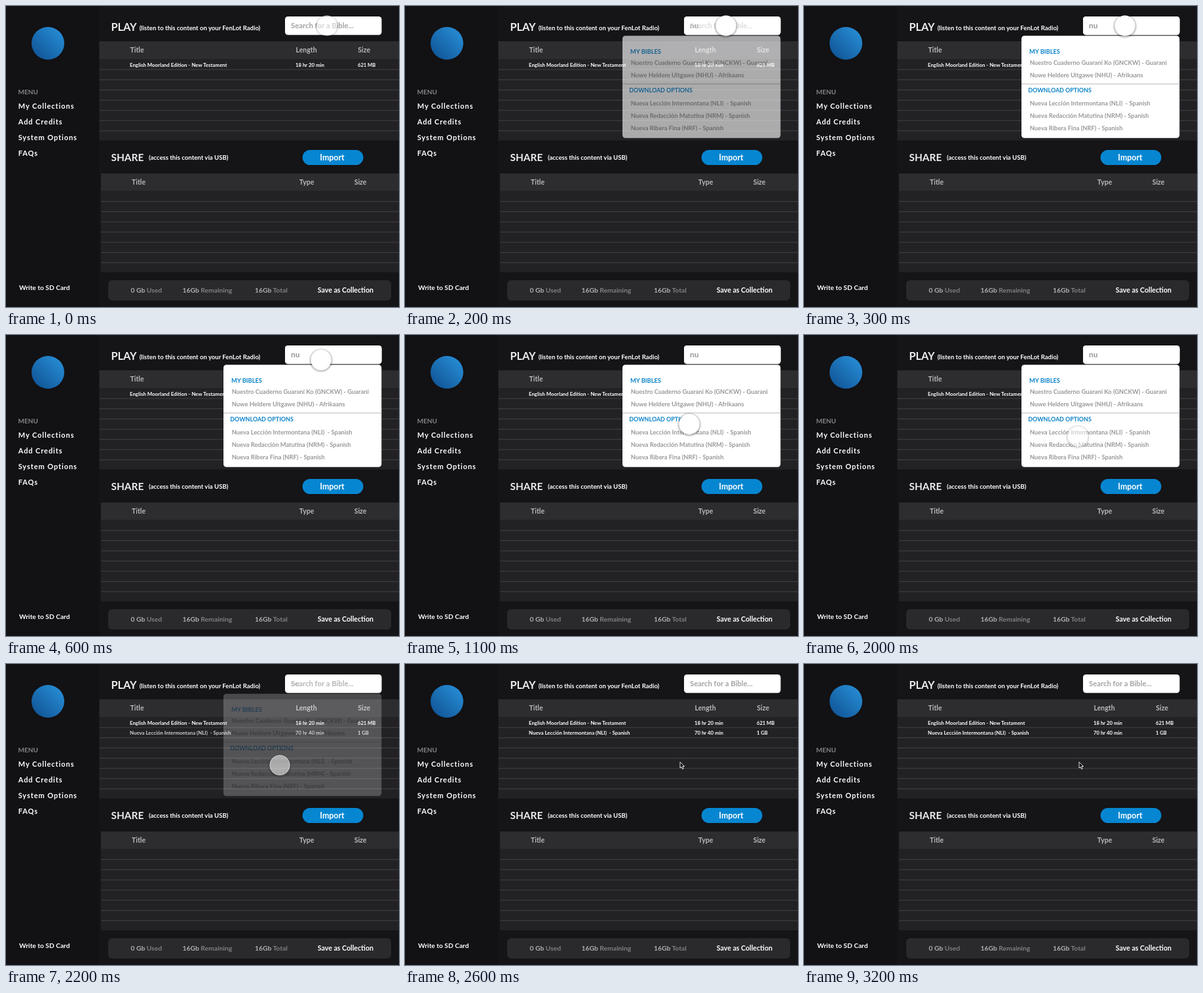
Recreate the animation shown at these times as an HTML page. Size 600 by 460 pixels, loop 3.3 s.

```html
<!DOCTYPE html>
<html lang="en">
<head>
<meta charset="utf-8">
<title>Content library</title>
<style>
  html, body { margin: 0; width: 100%; height: 100%; overflow: hidden; background: #141316; }
  svg { display: block; width: 600px; height: 460px; }
  text { font-family: Lato, "Open Sans", sans-serif; font-weight: 700; white-space: pre; }
</style>
</head>
<body>
<svg id="stage" viewBox="0 0 600 460" xmlns="http://www.w3.org/2000/svg">
  <defs>
    <linearGradient id="blue" x1="0" y1="1" x2="1" y2="0">
      <stop offset="0" stop-color="#0d4f8f"/>
      <stop offset="1" stop-color="#2a93dc"/>
    </linearGradient>
    <radialGradient id="halo">
      <stop offset=".76" stop-color="#000" stop-opacity="0"/>
      <stop offset=".83" stop-color="#000" stop-opacity=".25"/>
      <stop offset="1" stop-color="#000" stop-opacity="0"/>
    </radialGradient>
  </defs>
</svg>
<script>
const LOOP = 3300, STEP = 100;
const stage = document.getElementById('stage');

function add(parent, tag, attrs, content) {
  const node = document.createElementNS('http://www.w3.org/2000/svg', tag);
  for (const key in attrs) node.setAttribute(key, attrs[key]);
  if (content !== undefined) node.textContent = content;
  parent.appendChild(node);
  return node;
}
const group = () => add(stage, 'g', {});
const box = (parent, x, y, width, height, fill, rx = 0) =>
  add(parent, 'rect', { x, y, width, height, fill, rx });
const label = (parent, x, y, size, fill, content, spacing = 0) =>
  add(parent, 'text', { x, y, fill, 'font-size': size, 'letter-spacing': spacing }, content);
const searchBox = parent => box(parent, 426, 16, 147.5, 28.3, '#fff', 4.5);

function table(x, top, headHeight, bottom, firstLine, columns) {
  box(base, x, top, 600 - x, bottom - top, '#222124');
  box(base, x, top, 600 - x, headHeight, '#2d2c2f');
  for (let i = 0; i < 7; i++) box(base, x, firstLine + i * 15.6, 600 - x, 1.4, '#3a393c');
  for (const [cx, name] of columns) label(base, cx, top + 17.4, 10.5, '#b9b9bb', name);
}

function row(parent, y, title, length, size) {
  label(parent, 189, y, 7.85, '#fff', title);
  label(parent, 442, y, 7.8, '#fff', length);
  label(parent, 537, y, 7.6, '#fff', size);
}

const SPANISH = 'Nueva Lección Intermontana (NLI)  - Spanish';

// Static screen
const base = group();
box(base, 0, 0, 600, 460, '#151417');
box(base, 0, 0, 142, 460, '#121114');
add(base, 'circle', { cx: 64, cy: 57, r: 25, fill: 'url(#blue)' });

label(base, 18.5, 135.3, 10, '#858487', 'MENU');
['My Collections', 'Add Credits', 'System Options', 'FAQs'].forEach((name, i) =>
  label(base, 18.7, 156.8 + i * 24.1, 11, '#fff', name, 0.92));
label(base, 20, 433.6, 10.2, '#fff', 'Write to SD Card');

label(base, 160.5, 38, 16.3, '#ececec', 'PLAY');
label(base, 203.7, 36.9, 9.55, '#fff', '(listen to this content on your FenLot Radio)');
table(142.5, 54, 27, 205.5, 96.4, [[189.5, 'Title'], [442.5, 'Length'], [537.3, 'Size']]);
row(base, 92.8, 'English Moorland Edition - New Testament', '18 hr 20 min', '621 MB');

label(base, 160.5, 236.7, 15.4, '#ececec', 'SHARE');
label(base, 218, 234.6, 9.6, '#fff', '(access this content via USB)');
box(base, 452.7, 220, 92.8, 23, '#0686d1', 11.5);
label(base, 479.3, 235.5, 12.4, '#fff', 'Import');
table(145, 256, 26.5, 407, 298, [[192, 'Title'], [447.8, 'Type'], [531.7, 'Size']]);

box(base, 156, 419, 432, 31, '#2a292c', 6);
for (const [x, amount, kind] of [
  [190.5, '0 Gb', ' Used'], [269.5, '16Gb', ' Remaining'], [380, '16Gb', ' Total']
]) {
  const entry = label(base, x, 438, 10.3, '#b0b0b2', amount);
  add(entry, 'tspan', { fill: '#807f82' }, kind);
}
label(base, 475.8, 438, 10.6, '#fff', 'Save as Collection');

searchBox(base);
label(base, 435, 34.4, 11.3, '#a3a3a3', 'Search for a Bible...');

// Row that appears once a result is chosen
const added = group();
row(added, 108, SPANISH, '70 hr 40 min', '1 GB');

// Search results
const results = group();
searchBox(results);
label(results, 435, 34.4, 11.8, '#969696', 'nu');
box(results, 332, 45.5, 241.3, 156.2, '#fff', 4.5);
box(results, 332, 118.5, 241.3, 1.4, '#cbcbcb');
label(results, 344, 73.3, 9.3, '#0b83c9', 'MY BIBLES');
label(results, 342.3, 132.3, 8.95, '#0b83c9', 'DOWNLOAD OPTIONS');
[
  [89.6, 'Nuestro Cuaderno Guaraní Ko (GNCKW) - Guarani'],
  [108.5, 'Nuwe Heldere Uitgawe (NHU) - Afrikaans'],
  [152.4, SPANISH],
  [171.3, 'Nueva Redacción Matutina (NRM) - Spanish'],
  [190.3, 'Nueva Ribera Fina (NRF) - Spanish']
].forEach(([y, name]) => label(results, 344.7, y, 9.35, '#999', name));

// Pointers
const touch = group();
const halo = add(touch, 'circle', { cy: 1, r: 19, fill: 'url(#halo)' });
const disc = add(touch, 'circle', { r: 15.5, fill: '#fff' });
add(touch, 'circle', { r: 15, fill: 'none', stroke: '#fff', 'stroke-opacity': 0.4 });
const arrow = add(stage, 'path', {
  d: 'M420 149.8v9.2l2.1-1.9 1.5 3.5 1.6-.7-1.5-3.4h2.9z',
  fill: '#000', stroke: '#fff', 'stroke-width': 0.9, 'stroke-linejoin': 'round'
});

const ramp = (t, from, to) => Math.min(1, Math.max(0, (t - from) / (to - from)));
const easeInOut = (p, power) =>
  p < 0.5 ? Math.pow(2 * p, power) / 2 : 1 - Math.pow(2 - 2 * p, power) / 2;
const show = (node, visible) => node.setAttribute('visibility', visible ? 'visible' : 'hidden');

function draw(t) {
  const closing = ramp(t, 2045, 2245);
  results.setAttribute('opacity', ramp(t, 75, 275) * (1 - closing));
  added.setAttribute('opacity', closing);

  // The path bends because the two axes ease differently.
  const travel = ramp(t, 300, 1500);
  const x = 490 - 72 * easeInOut(travel, 2);
  const y = 30 + 124.5 * easeInOut(travel, 3);
  touch.setAttribute('transform', `translate(${x} ${y})`);

  const pressed = 1 - ramp(t, 0, 200) + ramp(t, 1450, 1600);
  disc.setAttribute('fill-opacity', 1 - 0.48 * pressed);
  halo.setAttribute('opacity', 1 - 0.45 * pressed);
  show(touch, t < 2350);
  show(arrow, t >= 2350);
}

const start = performance.now();
function tick() {
  const t = (performance.now() - start) % LOOP;
  draw(Math.floor(t / STEP) * STEP);
  requestAnimationFrame(tick);
}
tick();
</script>
</body>
</html>
```
